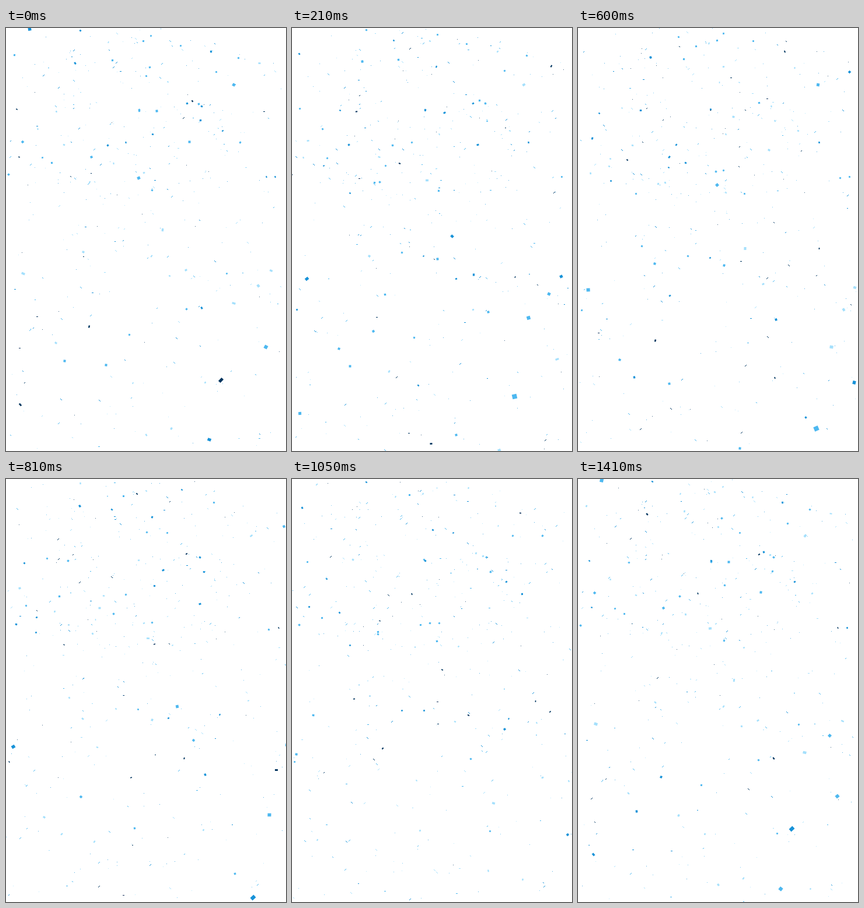
Animation, 480 px wide and 726 px high, one loop 1440 ms. Source, as an HTML page with a canvas:

```html
<!DOCTYPE html>
<html lang="en">
<head>
<meta charset="utf-8">
<title>Blue confetti</title>
<style>
  html, body { margin: 0; width: 100%; height: 100%; overflow: hidden; background: #fff; }
  canvas { display: block; width: 480px; height: 726px; }
</style>
</head>
<body>
<canvas id="stage" width="480" height="726"></canvas>
<script>
const LOOP = 1440, STEP = 30, UNIT = 210;
const CX = 230, CY = 205;
const ctx = document.getElementById('stage').getContext('2d');

// Nearest flakes: x, y, drift x and y per UNIT, size
const NEAR = [
  [368, 604, 13, 27, 8], [390, 472, 14.5, 24.5, 6], [445, 547, 9, 20, 6],
  [390, 97, 7, 0, 5], [268, 346, 6, 10.5, 5], [308, 415, 3, 7.7, 4],
  [249, 391, 0.2, 5.2, 4], [132, 384, -0.3, 6.5, 4], [29, 421, -4, 9, 6],
  [24, 646, -11, 15, 5], [118, 60, 1.8, -3.3, 4], [454, 416, 6.5, 9.5, 5],
  [335, 480, 1.4, 6.5, 4], [432, 442, 7.4, 13.5, 5], [240, 698, -2, 15, 4],
  [348, 706, 7, 19, 6], [171, 578, -4.8, 10.3, 4], [142, 512, -3.2, 7.8, 4],
  [146, 221, 3.2, 0, 4], [314, 195, 4.3, 4.6, 4], [258, 142, 2.5, 3.3, 4],
  [85, 540, -4.7, 9.5, 4], [434, 60, 10, 5, 4], [28, 195, -1.2, -1.8, 4],
  [100, 571, -1.3, 9, 4], [227, 257, 3.7, 3.8, 5], [40, 1, -1.2, -4.6, 6],
  [283, 687, -2, 11, 4]
];

let seed = 7193;
function rnd() {
  seed = (seed * 1664525 + 1013904223) >>> 0;
  return seed / 4294967296;
}
const bell = () => (rnd() + rnd() + rnd() - 1.5) * 2;
const clamp = v => Math.max(0, Math.min(1, v));

function tumble() {
  return { turns: 2 + Math.floor(rnd() * 4), phase: rnd(), tilt: rnd() * Math.PI };
}

const near = NEAR.map(([x, y, vx, vy, size]) => ({ x, y, vx, vy, size, ...tumble() }));

const far = Array.from({ length: 430 }, () => {
  const mid = rnd() < 0.5;
  const x = mid ? 220 + bell() * 105 : rnd() * 480;
  const y = mid ? 175 + bell() * 110 : rnd() * 726;
  const pull = 0.004 + 0.022 * rnd() ** 2;
  return {
    x, y,
    vx: (x - CX) * pull + bell() * 0.6,
    vy: (y - CY) * pull + bell() * 0.6,
    size: 0.9 + 2.5 * rnd() ** 2,
    birth: rnd(),
    ...tumble()
  };
});

function shade(spin) {
  const light = (Math.sin(spin) + 1) / 2;
  if (light < 0.025) return '#00355f';
  if (light < 0.3) return '#1792d8';
  if (light < 0.8) return '#4db8f0';
  return '#a5e0fc';
}

function flake(p, x, y, size, time) {
  if (size < 0.5 || x < -9 || x > 489 || y < -9 || y > 735) return;
  const spin = (time / LOOP * p.turns + p.phase) * Math.PI * 2;
  ctx.fillStyle = shade(spin);
  const px = Math.round(x), py = Math.round(y);
  if (size < 1.5) {
    ctx.globalAlpha = 0.75;
    ctx.fillRect(px, py, 1, 1);
  } else if (size < 2.7) {
    const slope = Math.round(Math.sin(spin + p.tilt) * 1.3);
    ctx.fillRect(px, py, 1, 1);
    ctx.fillRect(px + 1, py + slope, 1, 1);
    if (size > 2) ctx.fillRect(px - 1, py - slope, 1, 1);
  } else {
    ctx.save();
    ctx.translate(px + 0.5, py + 0.5);
    ctx.rotate(p.tilt + Math.sin(spin) * 0.6);
    const h = size * (0.5 + 0.5 * Math.abs(Math.cos(spin)));
    ctx.fillRect(-size / 2, -h / 2, size, h);
    ctx.restore();
  }
  ctx.globalAlpha = 1;
}

function drawNear(p, age, time) {
  const grow = clamp((age + 700) / 500) * clamp((1350 - age) / 450);
  if (grow <= 0) return;
  const s = age / UNIT;
  const way = s + 0.025 * s * s;
  flake(p, p.x + p.vx * way, p.y + p.vy * way, p.size * grow, time);
}

function drawFar(p, time) {
  const life = (time / LOOP + p.birth) % 1;
  const way = (life - 0.5) * LOOP / UNIT;
  const grow = clamp(Math.min(life, 1 - life) * 8);
  flake(p, p.x + p.vx * way, p.y + p.vy * way, p.size * grow, time);
}

function draw(time) {
  ctx.fillStyle = '#fff';
  ctx.fillRect(0, 0, 480, 726);
  far.forEach(p => drawFar(p, time));
  near.forEach(p => {
    drawNear(p, time, time);
    drawNear(p, time - LOOP, time);
  });
}

const start = performance.now();
function tick() {
  const t = (performance.now() - start) % LOOP;
  draw(Math.floor(t / STEP) * STEP);
  requestAnimationFrame(tick);
}
tick();
</script>
</body>
</html>
```
